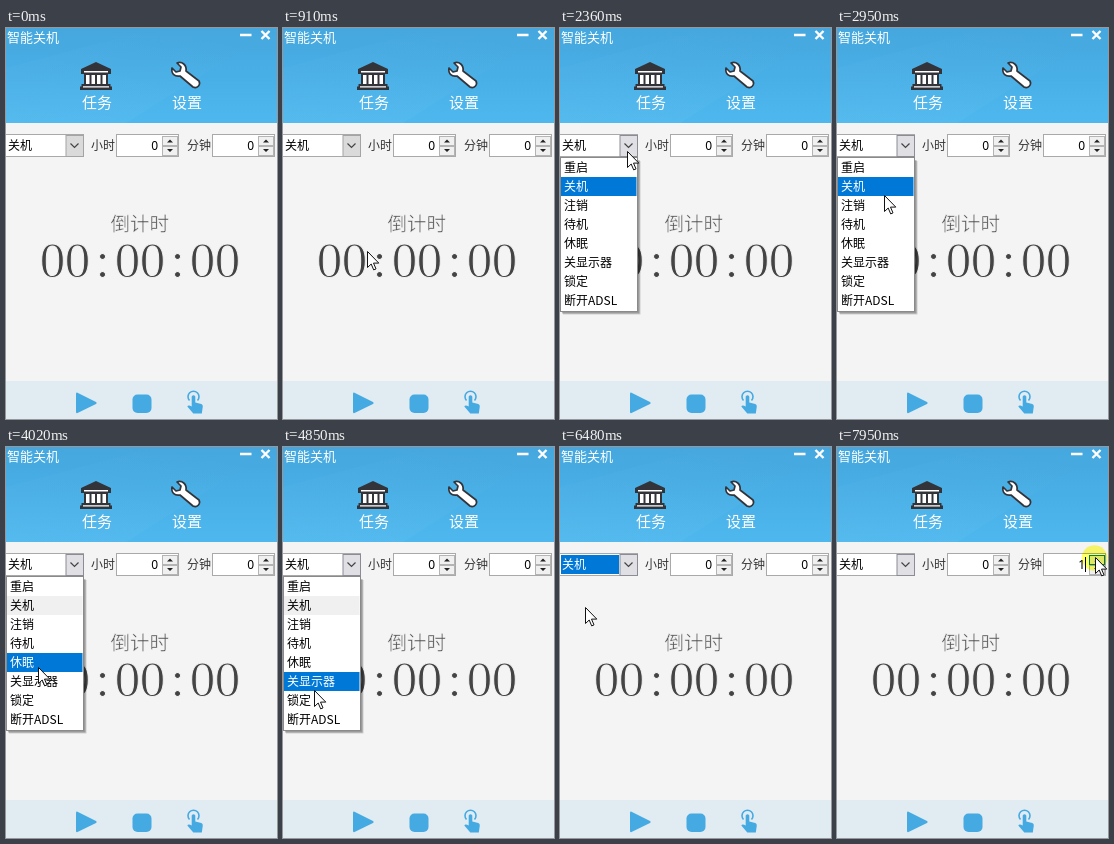
These frames come from a looping animation (271 px wide and 391 px high, 8000 ms). An HTML page:

```html
<!DOCTYPE html>
<html lang="zh-CN">
<head>
<meta charset="utf-8">
<style>
html, body { margin: 0; width: 100%; height: 100%; overflow: hidden; background: #f4f4f4; }
svg { display: block; width: 271px; height: 391px; }
text { font: 12px "Noto Sans CJK SC", "Noto Sans CJK", sans-serif; white-space: pre; }
.nav { font-size: 15px; fill: #fff; }
/* A background-coloured stroke thins the glyphs */
.thin { stroke: #f4f4f4; stroke-width: .5; }
.clock text { font: 51px "Liberation Serif", serif; fill: #444; text-anchor: middle; stroke-width: 1; }
.num { font: 12px "Noto Sans", sans-serif; text-anchor: end; }
.field { fill: #fff; stroke: #a9a9a9; }
.btn { fill: #f0f0f0; stroke: #b4b4b4; }
.blue { fill: #45aae2; }
#ring { mix-blend-mode: multiply; }
</style>
</head>
<body>
<svg viewBox="0 0 271 391">
  <defs>
    <linearGradient id="sky" x2="0" y2="1">
      <stop offset="0" stop-color="#45a7de"/>
      <stop offset=".5" stop-color="#48afe6"/>
      <stop offset="1" stop-color="#4eb8ee"/>
    </linearGradient>
    <linearGradient id="ray" x1="0" y1="1" x2=".7" y2="0">
      <stop offset="0" stop-color="#fff" stop-opacity=".04"/>
      <stop offset="1" stop-color="#fff" stop-opacity="0"/>
    </linearGradient>
    <clipPath id="below"><rect y="129" width="90" height="170"/></clipPath>
    <g id="spin">
      <rect class="field" x=".5" y="106.500" width="62" height="22"/>
      <rect class="btn" x="46.500" y="108.500" width="15" height="9"/>
      <rect class="btn" x="46.500" y="118.500" width="15" height="9"/>
      <path d="M51 114.500h6l-3-3zM51 121h6l-3 3z" fill="#222"/>
    </g>
  </defs>

  <rect width="271" height="391" fill="#f4f4f4"/>
  <rect width="271" height="95" fill="url(#sky)"/>
  <path d="M0 95V40L150 0H271L120 95z" fill="url(#ray)"/>
  <text x="1" y="14" style="font-size:13px" fill="#fff">智能关机</text>
  <path d="M234 7h11.500M255.500 3l8 8m0-8l-8 8" stroke="#fff" stroke-width="2.400" fill="none"/>

  <path d="M90 34L75 41V46H78V56H75.500V58.500H74V62H106V58.500H104.500V56H102V46H105V41z" fill="#33333a"/>
  <path d="M80 47h3.500v9H80zM85.500 47H89v9h-3.500zM91 47h3.500v9H91zM96.500 47h3.500v9h-3.500zM78 43h24v1.500H78zM77 58.300h26v1.200H77z" fill="#fff"/>
  <path d="M171 35l4 4-1 4-4 1-4-4c-1 6 3 9 8 8l13 11c4 2 8-2 6-6L180 43c1-6-4-10-9-8z"
        fill="#fff" stroke="#33333a" stroke-width="1.700" stroke-linejoin="round"/>
  <text class="nav" x="76" y="80">任务</text>
  <text class="nav" x="166" y="80">设置</text>

  <rect class="field" x="-.5" y="106.500" width="78" height="22"/>
  <rect id="picked" x="1" y="108" width="58" height="19" fill="#0078d7"/>
  <text id="choice" x="2" y="122">关机</text>
  <rect id="drop" x="60" y="107.500" width="17.500" height="21"/>
  <path d="M64.500 115.500l4 4 4-4" fill="none" stroke="#444" stroke-width="1.200"/>
  <text x="85" y="122" fill="#333">小时</text>
  <text x="181" y="122" fill="#333">分钟</text>
  <use href="#spin" x="110"/>
  <use href="#spin" x="206"/>
  <rect id="hot" x="252.500" y="108.500" width="15" height="9" fill="#cce4f7" fill-opacity=".5" stroke="#0078d7"/>
  <text class="num" x="152" y="122">0</text>
  <text class="num" id="minutes" x="248" y="122">0</text>
  <path id="caret" d="M248.500 110v15" stroke="#000"/>

  <text class="thin" x="104.500" y="203" style="font-size:19.500px" fill="#555">倒计时</text>
  <g class="clock" id="clock"></g>

  <rect y="353" width="271" height="38" fill="#e1ebf2"/>
  <path class="blue" d="M71 364.500q-1 0-1 1v18.500q0 1.500 1.500 1L90 376q1.500-1 0-2L72 365z"/>
  <rect class="blue" x="126.500" y="366.500" width="19" height="18.500" rx="5"/>
  <path d="M183.500 372.500a5.500 5.500 0 1 1 8 0" fill="none" stroke="#45aae2" stroke-width="1.600"/>
  <path class="blue" d="M185.700 368.500q1.800-2.500 3.600 0v6l6 1.500q1.700.5 1.500 2.500l-1 7h-8.500l-6-7q1-2 4.400 0z"/>

  <g id="menu" clip-path="url(#below)">
    <g id="sheet">
      <rect x="3" y="133" width="77.500" height="153.500" fill="#000" opacity=".16"/>
      <rect x="2" y="132" width="77.500" height="153.500" fill="#000" opacity=".25"/>
      <rect x=".5" y="129.500" width="77" height="154" fill="#fff" stroke="#8a8a8a"/>
      <g id="items"></g>
    </g>
  </g>

  <circle id="ring" r="12.800" fill="#ffff6a"/>
  <path id="arrow" d="M.5 .5V16.500L4.200 13 6.700 18.900 9 17.900 6.500 12.100H11.800z" fill="#fff" stroke="#111"/>
</svg>
<script>
const LOOP = 8000, TOP = 130, ROW = 19, CURRENT = 1;
const LABELS = ['重启', '关机', '注销', '待机', '休眠', '关显示器', '锁定', '断开ADSL'];
const $ = id => document.getElementById(id);

// Pointer path: time, x, y
const PATH = [
  [320, 185, 380], [700, 122, 278], [1100, 50, 174], [1170, 52, 170], [1660, 67, 123],
  [2360, 67, 123], [2950, 47, 167], [3140, 43, 178], [3210, 42, 180],
  [3970, 32, 218], [4020, 32, 220], [4540, 31, 246], [4800, 31, 246], [4980, 30, 237],
  [5470, 30, 237], [5780, 26, 188], [6180, 25, 160], [6740, 25, 160],
  [7310, 259, 102], [7560, 259, 102], [7700, 258, 110], [LOOP, 258, 110]
];

function add(parent, tag, attrs, text = '') {
  const node = document.createElementNS('http://www.w3.org/2000/svg', tag);
  for (const key in attrs) node.setAttribute(key, attrs[key]);
  node.textContent = text;
  return parent.appendChild(node);
}

[...'00:00:00'].forEach((ch, i) =>
  add($('clock'), 'text', { class: 'thin', x: 46.5 + 25 * i, y: 249 }, ch));

const rows = LABELS.map((label, i) => ({
  bar: add($('items'), 'rect', { x: 1, y: TOP + ROW * i, width: 75.5, height: ROW }),
  text: add($('items'), 'text', { x: 4, y: TOP + ROW * i + 14 }, label)
}));

const show = (id, on) => $(id).setAttribute('visibility', on ? 'visible' : 'hidden');
const move = (id, x, y) => $(id).setAttribute('transform', `translate(${x} ${y})`);
const within = (t, a, b) => t >= a && t < b;

function pointer(t) {
  const i = Math.max(1, PATH.findIndex(p => p[0] > t));
  const [a, b] = [PATH[i - 1], PATH[i]];
  const k = Math.max(0, (t - a[0]) / (b[0] - a[0]));
  return [1, 2].map(n => Math.round(a[n] + (b[n] - a[n]) * k));
}

function render(t) {
  const [x, y] = pointer(t);
  show('arrow', t >= 320);
  move('arrow', x, y);
  show('ring', within(t, 1740, 2000) || within(t, 6360, 6480) || t >= 7950);
  move('ring', x - .5, y + 1);

  const open = within(t, 1930, 6420);
  show('menu', open);
  move('sheet', 0, t < 2000 ? -34 : 0);
  const active = y < TOP ? CURRENT : Math.floor((y - TOP) / ROW);
  rows.forEach(({ bar, text }, i) => {
    bar.setAttribute('fill', i === active ? '#0078d7' : i === CURRENT ? '#f0f0f0' : '#fff');
    text.setAttribute('fill', i === active ? '#fff' : '#000');
  });

  const picked = within(t, 6420, 7950);
  show('picked', picked);
  $('choice').setAttribute('fill', picked ? '#fff' : '#000');
  const hover = within(t, 1600, 1930);
  $('drop').setAttribute('fill', hover ? '#cce4f7' : t < 1600 ? '#dadada' : '#dfdfe4');
  $('drop').setAttribute('stroke', hover ? '#0078d7' : t < 1600 ? '#a4a4a4' : '#8c8c96');

  show('hot', t >= 7600);
  show('caret', t >= 7950);
  $('minutes').textContent = t >= 7950 ? '1' : '0';
}

function tick() {
  render(performance.now() % LOOP);
  requestAnimationFrame(tick);
}
tick();
</script>
</body>
</html>
```
